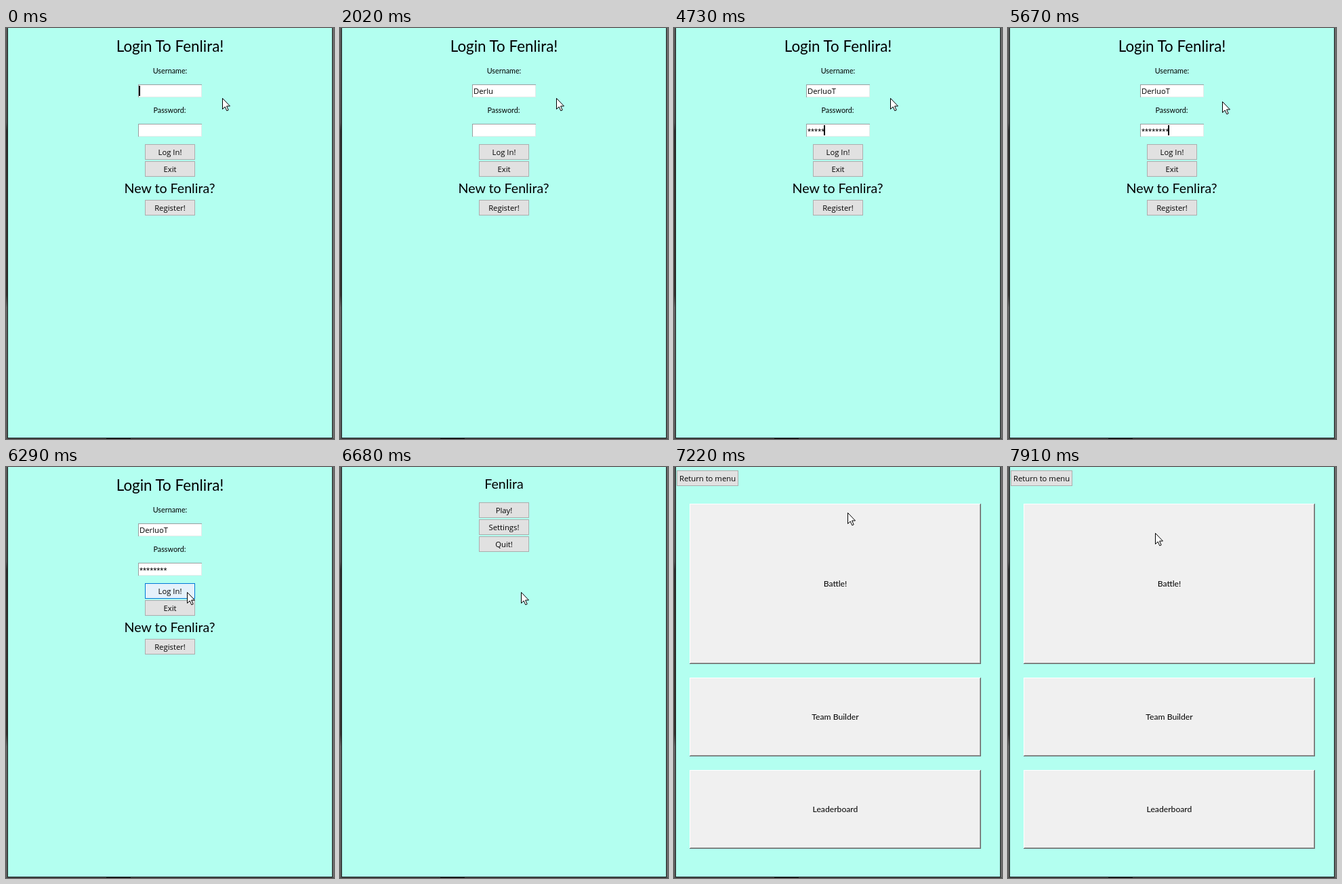
These frames come from a looping animation (484x605 px, 7990 ms). An HTML page:

```html
<!DOCTYPE html>
<html lang="en">
<head>
<meta charset="utf-8">
<title>Login demo</title>
<style>
  html, body { margin: 0; width: 100%; height: 100%; overflow: hidden; background: #b3fff0; }
  svg { display: block; width: 484px; height: 605px; }
  text { fill: #000; text-anchor: middle; white-space: pre; }
  .label { font-family: Lato, sans-serif; }
  .ui { font: 11.3px "Open Sans", sans-serif; }
  .field { text-anchor: start; }
  .stars { font: 13px "Liberation Sans", sans-serif; text-anchor: start; }
  .face { fill: #e1e1e1; stroke: #adadad; }
  .focus { fill: none; stroke: #000; stroke-dasharray: 1 1; visibility: hidden; }
  .hover .face { fill: #e5f1fb; stroke: #0078d7; }
  .down .face { fill: #cce4f7; stroke: #005499; }
  .down .focus { visibility: visible; }
</style>
</head>
<body>
<svg id="stage" viewBox="0 0 484 605" shape-rendering="crispEdges">
  <defs>
    <linearGradient id="edge" x2="0" y2="1">
      <stop offset="0" stop-color="#5a5a5a"/>
      <stop offset=".23" stop-color="#4c4c4c"/>
      <stop offset=".25" stop-color="#2c2c2c"/>
      <stop offset=".4" stop-color="#37332f"/>
      <stop offset=".65" stop-color="#34302e"/>
      <stop offset=".68" stop-color="#626262"/>
      <stop offset="1" stop-color="#5c5c5c"/>
    </linearGradient>
  </defs>
  <rect width="484" height="605" fill="#b3fff0"/>
  <rect width="2" height="605" fill="url(#edge)"/>
  <rect x="482" width="2" height="605" fill="#6a6a6a"/>
  <rect y="604" width="484" height="1" fill="#4a4a4a"/>
  <rect x="148" y="604" width="36" height="1" fill="#151515"/>
  <path d="M2.5 0V603.5H481.5V0" fill="none" stroke="#1c2625"/>
</svg>
<script>
const LOOP = 7990;
const stage = document.getElementById('stage');

function add(parent, tag, attrs = {}, text = '') {
  const el = document.createElementNS('http://www.w3.org/2000/svg', tag);
  for (const key in attrs) el.setAttribute(key, attrs[key]);
  el.textContent = text;
  parent.append(el);
  return el;
}

const label = (parent, text, x, y, size) =>
  add(parent, 'text', { class: 'label', x, y, 'font-size': size }, text);

function button(parent, text, x, y, w = 74, h = 23) {
  const el = add(parent, 'g');
  add(el, 'rect', { class: 'face', x: x + .5, y: y + .5, width: w - 1, height: h - 1 });
  add(el, 'rect', { class: 'focus', x: x + 2.5, y: y + 2.5, width: w - 5, height: h - 5 });
  add(el, 'text', { class: 'ui', x: x + w / 2, y: y + 16 }, text);
  return { el, parent, x, y, w, h };
}

function entry(parent, y, textClass, textY) {
  add(parent, 'rect', { x: 195, y, width: 94, height: 19, fill: '#fff' });
  add(parent, 'path', { d: `M195.5 ${y + 19}V${y + .5}H289`, fill: 'none', stroke: '#9a9fa0' });
  add(parent, 'path', { d: `M196 ${y + 18.5}H288.5V${y + 1}`, fill: 'none', stroke: '#e3ebe9' });
  const text = add(parent, 'text', { class: textClass, x: 197, y: textY });
  const caret = add(parent, 'rect', { y: y + 2, width: 2, height: 15 });
  return { text, caret };
}

function panel(parent, text, y, h) {
  const x = 23, w = 430;
  add(parent, 'rect', { x, y, width: w, height: h, fill: '#f0f0f0' });
  const edge = (d, stroke) => add(parent, 'path', { d, stroke, fill: 'none' });
  edge(`M${x + .5} ${y + h - 1}V${y + .5}H${x + w - 1}`, '#fff');
  edge(`M${x + 1} ${y + h - 1.5}H${x + w - 1.5}V${y + 1}`, '#a0a0a0');
  edge(`M${x} ${y + h - .5}H${x + w - .5}V${y}`, '#696969');
  label(parent, text, x + w / 2, y + h / 2 + 4, 12.2);
}

const login = add(stage, 'g');
const menu = add(stage, 'g');
const lobby = add(stage, 'g');

label(login, 'Login To Fenlira!', 242, 35, 22.4);
label(login, 'Username:', 242, 67, 10.8);
const user = entry(login, 83, 'ui field', 97);
label(login, 'Password:', 241.5, 125, 10.8);
const pass = entry(login, 141, 'stars', 157);
const logIn = button(login, 'Log In!', 205, 171);
const exit = button(login, 'Exit', 205, 196);
label(login, 'New to Fenlira?', 241.5, 243, 19.6);
const register = button(login, 'Register!', 205, 253);

label(menu, 'Fenlira', 242, 32, 19.6);
const play = button(menu, 'Play!', 205, 52);
const settings = button(menu, 'Settings!', 205, 77);
const quit = button(menu, 'Quit!', 205, 102);

const back = button(lobby, 'Return to menu', 4, 5, 91);
panel(lobby, 'Battle!', 54, 236);
panel(lobby, 'Team Builder', 310, 116);
panel(lobby, 'Leaderboard', 446, 116);

const buttons = [logIn, exit, register, play, settings, quit, back];
const glow = add(stage, 'circle', { r: 11.5, fill: '#f2ea40', 'fill-opacity': .7, 'shape-rendering': 'auto' });
const pointer = add(stage, 'path', {
  d: 'M.5 .5V16.5L4.2 13L6.8 18.8L9.2 17.8L6.6 12H11.5Z',
  fill: '#fff', stroke: '#000', 'shape-rendering': 'auto'
});

// All times in ms.
const userKeys = [920, 1080, 1240, 1480, 1710, 2090, 2250];
const passKeys = [4110, 4270, 4420, 4580, 4730, 4970, 5200, 5360];
const userCaret = [[0, 70], [370, 920], [1240, 1870], [2170, 2790]];
const passCaret = [[3100, 3720], [3950, 4420], [4730, 5360], [5670, 6280]];
const menuAt = 6600, lobbyAt = 7220;
const clicks = [[6450, menuAt, logIn], [7060, lobbyAt, play]];
const track = [
  [0, 319, 103], [5590, 319, 103], [6130, 267, 184], [6680, 267, 184],
  [7000, 256, 67], [7260, 256, 67], [7610, 217, 82], [7780, 217, 82], [7910, 217, 97], [LOOP, 217, 97]
];

const within = (spans, t) => spans.some(([a, b]) => t >= a && t < b);
const typed = (keys, t) => keys.filter(k => k <= t).length;
const show = (el, on) => el.setAttribute('display', on ? 'inline' : 'none');

function mouseAt(t) {
  const i = track.findIndex(p => p[0] > t);
  const [t0, x0, y0] = track[i - 1], [t1, x1, y1] = track[i];
  const u = (t - t0) / (t1 - t0), e = u * u * (3 - 2 * u);
  return [Math.round(x0 + (x1 - x0) * e), Math.round(y0 + (y1 - y0) * e)];
}

function setField(field, value, caretOn) {
  if (field.text.textContent !== value) field.text.textContent = value;
  const width = value ? field.text.getComputedTextLength() : 0;
  field.caret.setAttribute('x', 196 + Math.round(width));
  show(field.caret, caretOn);
}

function draw(now) {
  const t = now % LOOP;
  const [x, y] = mouseAt(t);
  const screen = t < menuAt ? login : t < lobbyAt ? menu : lobby;
  for (const s of [login, menu, lobby]) show(s, s === screen);
  if (screen === login) {
    setField(user, 'DerluoT'.slice(0, typed(userKeys, t)), within(userCaret, t));
    setField(pass, '*'.repeat(typed(passKeys, t)), within(passCaret, t));
  }
  const click = clicks.find(([a, b]) => t >= a && t < b);
  for (const b of buttons) {
    const over = b.parent === screen && x >= b.x && x < b.x + b.w && y >= b.y && y < b.y + b.h;
    b.el.setAttribute('class', click && click[2] === b ? 'down' : over ? 'hover' : '');
  }
  show(glow, click);
  glow.setAttribute('transform', `translate(${x} ${y + 1})`);
  pointer.setAttribute('transform', `translate(${x} ${y})`);
}

const start = performance.now();
(function tick() {
  draw(performance.now() - start);
  requestAnimationFrame(tick);
})();
</script>
</body>
</html>
```
